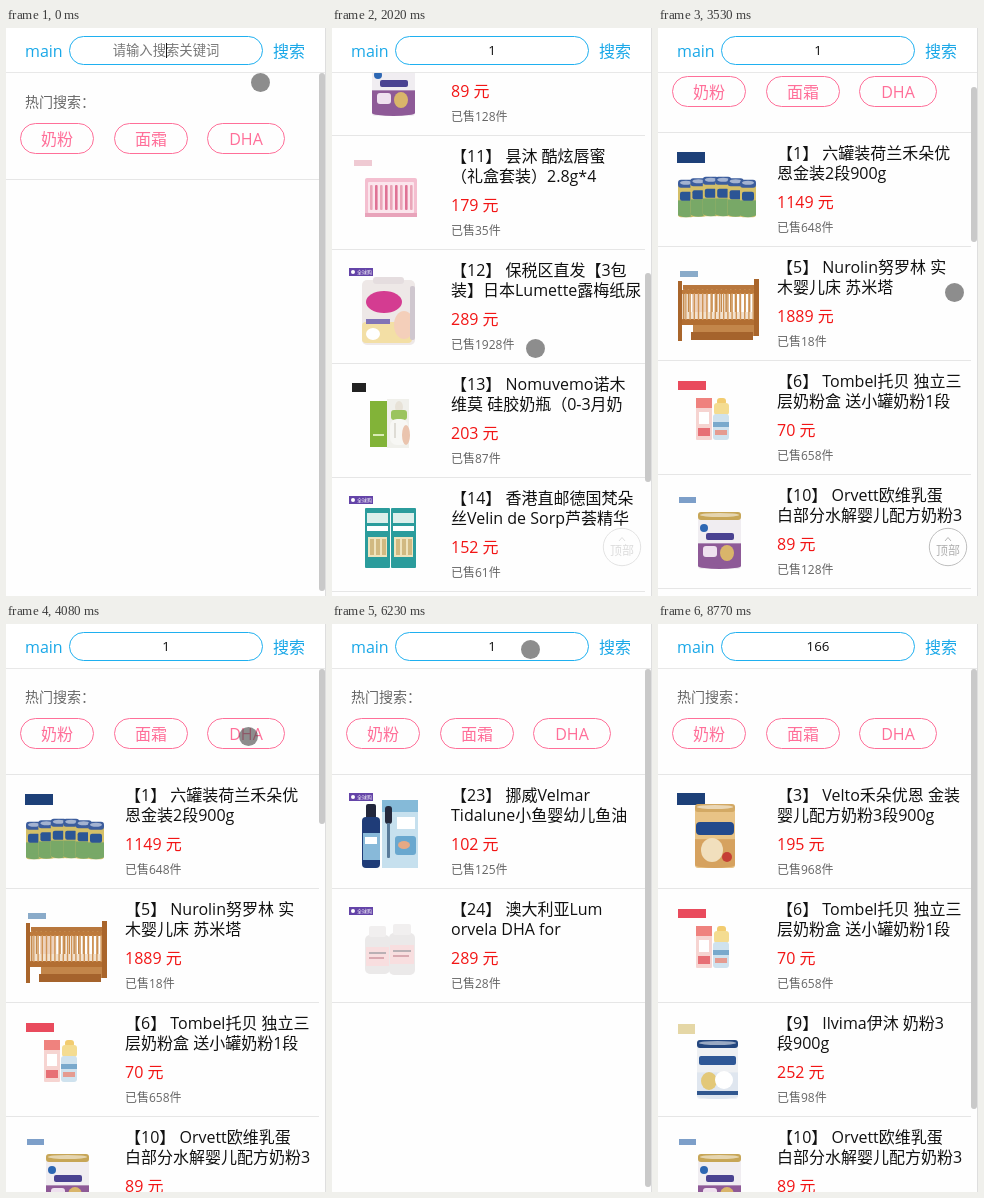
Write an HTML page that moves like this. It is 320 by 568 pixels and loops after 9640 ms.

```html
<!DOCTYPE html>
<html lang="zh-CN">
<head>
<meta charset="utf-8">
<title>搜索</title>
<style>
html, body { margin: 0; width: 100%; height: 100%; overflow: hidden; background: #fefefe; }
#stage { position: relative; width: 320px; height: 568px; overflow: hidden; white-space: nowrap;
  font: 16px/20px "Open Sans", "Noto Sans CJK SC", "Noto Sans CJK JP", sans-serif; color: #111; }
#stage div, #stage span, #stage svg { position: absolute; box-sizing: border-box; }
#head { width: 319px; height: 45px; background: #fff; border-bottom: 1px solid #e8e8e8; color: #1aa8e8; }
#field { left: 63px; top: 8px; width: 194px; height: 29px; border: 1px solid #1fb0f0; border-radius: 15px;
  font-size: 13.33px; line-height: 27px; text-align: center; color: #111; }
#caret { left: 160px; top: 15px; width: 1px; height: 15px; background: #111; }
#page { top: 45px; width: 313px; }
#hot { width: 313px; height: 107px; border-bottom: 1px solid #e6e6e6; }
.pill { top: 50px; height: 31px; border: 1px solid #ff6f99; border-radius: 16px; color: #ff6f99;
  line-height: 30px; text-align: center; }
.list { top: 107px; }
.item { width: 313px; height: 114px; border-bottom: 1px solid #e6e6e6; }
.item svg { left: 0; top: -1px; }
.item span { left: 119px; }
#bar { left: 313px; width: 6px; border-radius: 3px; background: #c9c9c9; }
#edge { left: 319px; width: 1px; height: 568px; background: #dedede; }
#dot { width: 19px; height: 19px; margin: -9.5px; border-radius: 50%; background: rgba(75,75,75,.63); }
</style>
</head>
<body>
<div id="stage">
  <div id="page">
    <div id="hot">
      <span style="left:19px;top:19px;font-size:14px;color:#666">热门搜索：</span>
      <div class="pill" style="left:14px;width:74px">奶粉</div>
      <div class="pill" style="left:108px;width:74px">面霜</div>
      <div class="pill" style="left:201px;width:78px">DHA</div>
    </div>
    <div id="loading">
      <svg width="20" height="20" style="left:121px;top:125px"><circle id="spin" cx="10" cy="10" r="8.5"
        fill="none" stroke="#888" stroke-width="1.3" stroke-dasharray="43.4 10"/></svg>
      <span style="left:148px;top:125px;font-size:12px;color:#666">加载中..</span>
    </div>
  </div>
  <div id="head">
    <span style="left:19px;top:13px">main</span>
    <div id="field"></div>
    <div id="caret"></div>
    <span style="left:267px;top:13px">搜索</span>
  </div>
  <svg id="up" width="40" height="40" style="left:270px;top:499px">
    <circle cx="20" cy="20" r="18.7" fill="#fff" stroke="#444" stroke-width=".9"/>
    <path d="M17 14l3-3.5 3 3.5" fill="none" stroke="#444"/>
    <text x="20" y="27.5" font-size="12" text-anchor="middle" fill="#333">顶部</text>
  </svg>
  <div id="bar"></div>
  <div id="edge"></div>
  <div id="dot"></div>
</div>
<script>
const $ = id => document.getElementById(id);
const R = (x, y, w, h, fill, rx = 0) =>
  `<rect x="${x}" y="${y}" width="${w}" height="${h}" rx="${rx}" fill="${fill}"/>`;
const E = (x, y, rx, ry, fill) => `<ellipse cx="${x}" cy="${y}" rx="${rx}" ry="${ry}" fill="${fill}"/>`;
const row = (n, draw) => Array.from({ length: n }, (_, i) => draw(i)).join('');
const badge = R(17, 19, 24, 8, '#6444a8') + E(21, 23, 2, 2, '#fff') +
  '<text x="25" y="25.3" font-size="5" fill="#fff">全球购</text>';

// A tin with a lid, a body and a coloured lower band
const tin = (x, y, w, h, lid, body, band) =>
  R(x, y + 4, w, h - 4, body, 3) + R(x, y + h * .55, w, h * .4, band) +
  E(x + w / 2, y + h - 3, w / 2, 3, band) + R(x, y, w, 8, lid, 3) + E(x + w / 2, y + 3, w / 2 - 2, 2, '#fff8');
const jar = (x, y, w) =>
  R(x, y + 11, w, 34, '#f8e6c4', 9) + R(x + 4, y, w - 8, 13, '#eda053', 4) +
  R(x + 7, y + 21, w - 14, 13, '#e9a65c', 2) + E(x + w / 2, y + 41, w / 3, 2, '#e6cb9a');
const bottle = (x, y, w, h) =>
  R(x, y + 9, w, h - 9, '#ebe9e9', 5) + R(x + 4, y, w - 8, 11, '#f1efef', 2) +
  R(x + 1, y + 21, w - 2, 19, '#f8dedf') + R(x + 4, y + 26, w - 8, 2, '#b9b0b4') + R(x + 4, y + 31, w - 10, 2, '#d9a9b0');
const packet = x =>
  R(x, 31, 25, 60, '#2b9c9c', 1) + R(x + 2, 36, 21, 10, '#dcefeb') + R(x + 2, 49, 21, 5, '#fff') +
  R(x + 3, 60, 19, 20, '#efe3bd') + row(3, i => R(x + 5 + i * 6, 62, 4, 16, '#d1b981'));

const goods = {
  1: ['【1】 六罐装荷兰禾朵优', '恩金装2段900g', 1149, 648,
    R(19, 20, 28, 11, '#1d4078') + row(6, i => {
      const x = 20 + i * 12.4, y = 44 + Math.abs(i - 2.5) * 1.5;
      return tin(x, y, 16, 40 - Math.abs(i - 2.5), '#3c5d9d', '#d4bf68', '#78a867') +
        R(x + 2, y + 12, 12, 9, '#2c5595', 2);
    })],
  5: ['【5】 Nurolin努罗林 实', '木婴儿床 苏米塔', 1889, 18,
    R(22, 25, 18, 6, '#8aabc9') + R(25, 39, 72, 5, '#b8773d') + row(16, i => R(25 + i * 4.7, 43, 1.6, 32, '#c48a4c')) +
    R(34, 47, 16, 26, '#edd2bd', 3) + R(29, 66, 65, 8, '#f2e2cf') +
    R(20, 44, 78, 4, '#bd7a3c') + R(20, 73, 78, 6, '#b26e32') + row(18, i => R(23 + i * 4.2, 47, 1.4, 27, '#cf9355')) +
    R(20, 35, 4, 60, '#a9652b') + R(96, 33, 5, 57, '#a9652b') + R(35, 79, 61, 11, '#c3864a') + R(33, 86, 62, 8, '#a5632c')],
  6: ['【6】 Tombel托贝 独立三', '层奶粉盒 送小罐奶粉1段', 70, 658,
    R(20, 21, 28, 9, '#e94b5d') + R(38, 38, 16, 42, '#f6d4d1', 1) + R(38, 38, 16, 10, '#ef827e') +
    R(41, 52, 10, 12, '#fff') + R(40, 68, 12, 8, '#e76f75') +
    R(59, 38, 9, 7, '#f2cc70', 3) + R(56, 43, 15, 12, '#f4dc91', 3) + R(55, 54, 16, 26, '#cfe2ee', 3) +
    R(55, 62, 16, 5, '#79a9cc') + R(57, 70, 12, 5, '#e59b90')],
  10: ['【10】 Orvett欧维乳蛋', '白部分水解婴儿配方奶粉3', 89, 128,
    R(21, 23, 17, 6, '#7d9fc9') + tin(40, 38, 43, 57, '#c7a657', '#f0edf1', '#8e5a97') +
    E(46, 54, 4, 4, '#2d67b3') + R(48, 59, 28, 7, '#4a4291', 2) + R(45, 72, 14, 11, '#efe1ef', 3) + E(69, 79, 7, 8, '#d9b56a')],
  11: ['【11】 昙沐 酷炫唇蜜', '（礼盒套装）2.8g*4', 179, 35,
    R(22, 25, 18, 6, '#efcad3') + R(33, 43, 52, 39, '#f4bfd0', 2) + R(36, 47, 46, 31, '#fbe5ec', 1) +
    row(9, i => R(38 + i * 5, 50, 2.6, 25, i % 2 ? '#df7295' : '#eaa6b9', 1)) + R(33, 78, 52, 4, '#e8a3ba')],
  12: ['【12】 保税区直发【3包', '装】日本Lumette露梅纸尿', 289, 1928,
    badge + R(30, 31, 53, 65, '#eee8e7', 5) + R(41, 28, 31, 7, '#e5dddf', 3) + R(30, 73, 50, 21, '#f3dfa5', 4) +
    E(52, 53, 18, 11, '#d43c91') + E(72, 76, 10, 14, '#f4cfba') + R(34, 70, 24, 5, '#8274b6') +
    E(41, 85, 7, 6, '#fff') + R(78, 37, 5, 54, '#cfc7cf', 2)],
  13: ['【13】 Nomuvemo诺木', '维莫 硅胶奶瓶（0-3月奶', 203, 87,
    R(20, 20, 14, 9, '#222') + R(38, 38, 17, 46, '#82b338') + R(55, 36, 22, 49, '#f0f0eb') +
    E(67, 44, 4, 6, '#e7e2d7') + R(59, 47, 16, 10, '#9bc45e', 3) + R(58, 56, 18, 26, '#f7f7f4', 7) +
    R(62, 60, 2, 15, '#dedcd5') + E(74, 72, 4, 10, '#eac4ae') + R(41, 71, 11, 2, '#d9ebb4')],
  14: ['【14】 香港直邮德国梵朵', '丝Velin de Sorp芦荟精华', 152, 61, badge + packet(33) + packet(59)],
  15: ['【15】 保税区直发禾泉坊', '莹鹿脂香草味温和保湿无', 269, 73, badge + jar(25, 37, 32) + jar(49, 38, 37)],
  16: ['【16】 香港直邮日本', 'Milorentavel眼膜保湿', 219, 13,
    badge + E(69, 62, 29, 29, '#e3e3e3') + E(69, 60, 26, 26, '#f4f4f4') + E(43, 66, 26, 27, '#d9d9d9') +
    E(43, 64, 24, 24, '#f5f5f5') + '<path d="M63 54l22 14" stroke="#555" stroke-width="5"/>' +
    E(63, 54, 11, 11, '#282828') + E(63, 54, 4, 4, '#eee')],
  23: ['【23】 挪威Velmar', 'Tidalune小鱼婴幼儿鱼油', 102, 125,
    badge + R(50, 26, 36, 68, '#c6e0ee') + R(50, 26, 36, 12, '#85bad8') + R(65, 43, 18, 12, '#fff') +
    R(63, 62, 21, 19, '#6aa8cf', 3) + E(72, 71, 6, 4, '#e7a984') + R(34, 30, 10, 16, '#22263b', 2) +
    R(30, 43, 18, 51, '#1f3c78', 4) + R(31, 59, 17, 27, '#88b9d9') + R(33, 63, 12, 7, '#fff') +
    R(53, 32, 7, 18, '#252a3d', 3) + R(55, 49, 3, 35, '#587b9a', 1)],
  24: ['【24】 澳大利亚Lum', 'orvela DHA for', 289, 28, badge + bottle(33, 38, 25, 48) + bottle(57, 36, 26, 51)],
  3: ['【3】 Velto禾朵优恩 金装', '婴儿配方奶粉3段900g', 195, 968,
    R(19, 19, 28, 12, '#1d4078') + tin(37, 30, 40, 64, '#d3a964', '#e8c386', '#d6a25f') +
    R(38, 48, 38, 13, '#234a8c', 4) + E(54, 76, 11, 12, '#f1dfbd') + E(69, 83, 5, 5, '#c53e36')],
  9: ['【9】 Ilvima伊沐 奶粉3', '段900g', 252, 98,
    R(20, 22, 17, 10, '#e5d7a6') + tin(39, 38, 41, 59, '#24477f', '#eef0f3', '#dfe6ef') +
    R(41, 54, 37, 9, '#2e5796', 2) + E(51, 79, 8, 9, '#e3c878') + E(66, 78, 9, 9, '#fff') + R(39, 89, 41, 4, '#31578f')]
};

const makeList = ids => {
  const list = document.createElement('div');
  list.className = 'list';
  list.innerHTML = ids.map((id, i) => {
    const [a, b, price, sold, art] = goods[id];
    return `<div class="item" style="top:${i * 114}px"><svg width="115" height="112">${art}</svg>
      <span style="top:10px">${a}<br>${b}</span>
      <span style="top:59px;color:#f21515">${price} 元</span>
      <span style="top:85px;font-size:12px;color:#666">已售${sold}件</span></div>`;
  }).join('');
  $('page').append(list);
  return list;
};
const lists = [
  { el: makeList([1, 5, 6, 10, 11, 12, 13, 14, 15, 16]), from: 1340, to: 4600 },
  { el: makeList([23, 24]), from: 5050, to: 6900 },
  { el: makeList([3, 6, 9, 10]), from: 8400, to: 9640 }
];

// The screen refreshes in bursts: [first, last, count]
const ticks = [[0, 0, 1], [130, 1060, 8], [1220, 2020, 7], [2140, 2140, 1], [2290, 3130, 7], [3260, 3260, 1],
  [3380, 3530, 2], [3650, 4080, 4], [4350, 4900, 5], [5050, 5290, 3], [5410, 5790, 3], [6230, 6230, 1],
  [6380, 7190, 7], [7340, 8280, 8], [8400, 8770, 4]]
  .flatMap(([a, b, n]) => Array.from({ length: n }, (_, i) => a + (b - a) * i / (n - 1 || 1)));

const pointer = [[0, 254, 54], [400, 258, 48], [780, 280, 27], [1060, 272, 33], [1490, 225, 440], [2020, 203, 320],
  [2140, 200, 295], [2570, 215, 390], [2990, 292, 518], [3130, 292, 518], [3260, 293, 490], [3530, 296, 264],
  [3800, 262, 150], [4080, 242, 112], [4490, 240, 110], [4900, 157, 107], [5290, 173, 23], [5790, 193, 27],
  [6230, 198, 25], [6500, 215, 26], [6790, 281, 24], [7190, 215, 68], [8280, 67, 395]];
const scroll = [[1220, 0], [1340, 1], [1490, 1], [1750, 230], [2020, 500], [2140, 560], [2570, 705], [3130, 705],
  [3260, 430], [3380, 150], [3530, 47], [3650, 14], [3800, 1]];
const fade = [[1880, 0], [2020, .16], [2430, .5], [2850, .5], [2990, 1], [3260, 1], [3530, .38], [3800, 0]];

const at = (keys, t, k = 1) => {
  const i = keys.findIndex(p => p[0] > t);
  if (i < 0) return keys[keys.length - 1][k];
  if (!i) return keys[0][k];
  const a = keys[i - 1], b = keys[i];
  return a[k] + (b[k] - a[k]) * (t - a[0]) / (b[0] - a[0]);
};
const show = (el, on) => el.style.display = on ? '' : 'none';
const within = (t, a, b) => t >= a && t < b;

function draw(now) {
  const time = now % 9640;
  const t = ticks.filter(v => v <= time).pop();
  const y = Math.round(at(scroll, t));
  $('page').style.top = 45 - y + 'px';
  lists.forEach(l => show(l.el, within(t, l.from, l.to)));
  show($('loading'), within(t, 780, 1340) || within(t, 4600, 5050) || within(t, 6900, 8400));
  $('spin').setAttribute('transform', `rotate(${(t - 4900) * .36 + 25} 10 10)`);

  const count = within(t, 1340, 4600) ? (t < 2700 ? 10 : 14) : t >= 8400 ? 4 : 0;
  const height = count ? 166 + count * 114 : 528;
  $('bar').style.top = 45 + Math.max(0, y - 1) / height * 523 + 'px';
  $('bar').style.height = 523 * 523 / height + 'px';

  $('field').textContent = t < 390 ? '请输入搜索关键词' : t < 6500 ? '1' : t < 6630 ? '16' : '166';
  $('field').style.color = t < 390 ? '#777' : '#111';
  show($('caret'), t < 390);
  $('up').style.opacity = at(fade, t);
  $('dot').style.left = at(pointer, t) + 'px';
  $('dot').style.top = at(pointer, t, 2) + 'px';
  show($('dot'), t < 8770);
}
const start = performance.now();
(function loop() {
  draw(performance.now() - start);
  requestAnimationFrame(loop);
})();
</script>
</body>
</html>
```
